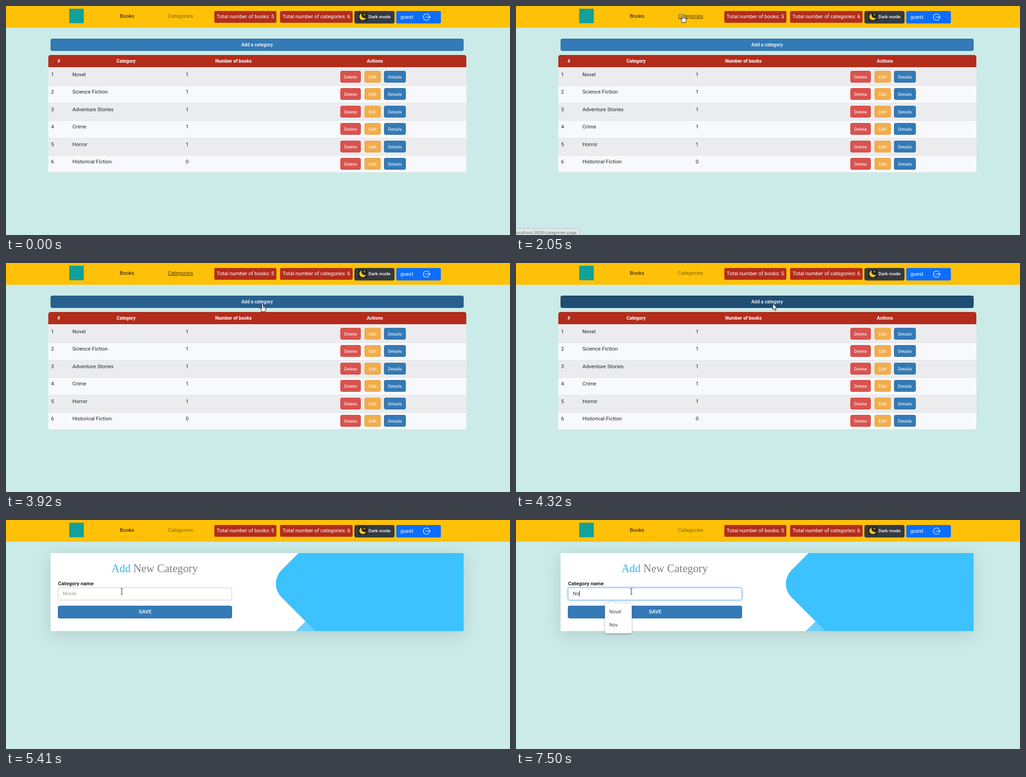
An HTML page for the animation above (8000 ms loop, 1108 by 505 pixels).

```html
<!DOCTYPE html>
<html lang="en">
<head>
<meta charset="utf-8">
<title>Category manager</title>
<style>
  html, body { margin: 0; width: 100%; height: 100%; overflow: hidden; background: #cbebe8; }
  svg { display: block; width: 100%; height: 100%; }
  text { font-family: Roboto, sans-serif; white-space: pre; }
  .serif { font-family: "Liberation Serif", serif; }
  .system { font-family: "Open Sans", sans-serif; }
  .card { filter: drop-shadow(0 7px 19px rgba(0, 0, 0, .13)); }
  .popup { filter: drop-shadow(0 1px 2px rgba(0, 0, 0, .35)); }
  .glow { filter: drop-shadow(0 0 3px rgba(102, 175, 233, .7)); }
</style>
</head>
<body>
<svg id="stage" viewBox="0 0 1108 505"></svg>
<script>
const LOOP = 8000;
const RED = '#b32c1c', BLUE = '#337ab7', BLUE_EDGE = '#2e6da4', INK = '#212529';

const rect = (x, y, w, h, fill, extra = '') =>
  `<rect x="${x}" y="${y}" width="${w}" height="${h}" fill="${fill}" ${extra}/>`;
const box = (x, y, w, h, fill, edge, extra = '') =>
  rect(x + .5, y + .5, w - 1, h - 1, fill, `rx="3" stroke="${edge}" ${extra}`);
const path = (d, fill, extra = '') => `<path d="${d}" fill="${fill}" ${extra}/>`;
const text = (x, y, label, size, fill, extra = '') =>
  `<text x="${x}" y="${y}" font-size="${size}" fill="${fill}" ${extra}>${label}</text>`;
const centered = (x, y, label, size, fill, weight = 400) =>
  text(x, y, label, size, fill, `text-anchor="middle" font-weight="${weight}"`);
const group = (id, body, extra = '') => `<g id="${id}" ${extra}>${body}</g>`;

function navbar() {
  return rect(0, 0, 1108, 48, '#ffc107') +
    rect(139, 6, 32, 32, '#12a19a') +
    text(250, 26, 'Books', 11.5, '#1a1401', 'id="books"') +
    text(356, 26, 'Categories', 11.5, '#80610a', 'id="categories"') +
    rect(458, 11, 136.5, 26, RED, 'rx="3"') +
    text(463, 27, 'Total number of books: 5', 11.42, '#fff') +
    rect(602.5, 11, 159.5, 26, RED, 'rx="3"') +
    text(608, 27, 'Total number of categories: 6', 11.42, '#fff') +
    box(766, 11, 88, 27.5, '#343a40', '#2b3035') +
    rect(775, 15, 19, 18, '#22262a') +
    path('M782 16.5a7.5 7.5 0 1 0 9.5 9.5a7.3 7.3 0 0 1-9.5-9.5z', '#ffc61a') +
    path('M788 16.5l.8 1.8 1.8.7-1.8.7-.8 1.8-.8-1.8-1.8-.7 1.8-.7z', '#ffc61a') +
    text(797, 27, 'Dark mode', 9.95, '#fff', 'font-weight="500"') +
    rect(858, 11, 98, 27.5, '#0d6efd', 'rx="3"') +
    text(867, 28, 'guest', 11.45, '#fff') +
    path('M930 20.2a7 7 0 1 0 0 8.6M922 24.5h10.5m-3-3l3 3-3 3', 'none',
      'stroke="#fff" stroke-width="1.2"');
}

function tablePage() {
  const rows = ['Novel', 'Science Fiction', 'Adventure Stories', 'Crime', 'Horror', 'Historical Fiction'];
  const actions = [
    [735, 45, 'Delete', '#d9534f', '#d43f3a'],
    [788, 36, 'Edit', '#f0ad4e', '#eea236'],
    [831, 48, 'Details', BLUE, BLUE_EDGE],
  ];
  const rowTop = i => i ? Math.round(137 + 38.4 * i) : 135;
  const body = rows.map((name, i) => {
    const top = rowTop(i), dy = Math.round(38.4 * i), base = 155 + dy;
    return rect(93, top, 919, rowTop(i + 1) - top, i % 2 ? '#f8f9fc' : '#ececee') +
      (i ? rect(93, top, 919, 1, '#dfe3e6') : '') +
      text(99, base, i + 1, 11.5, INK) +
      text(146, base, name, 11.5, INK) +
      text(395, base, i < 5 ? 1 : 0, 11.5, INK) +
      actions.map(([x, w, label, fill, edge]) =>
        box(x, 143 + dy, w, 26, fill, edge) +
        centered(x + w / 2, 159.5 + dy, label, 9.95, '#fff')).join('');
  }).join('');
  const heads = [[116, '#'], [264, 'Category'], [500, 'Number of books'], [811, 'Actions']];
  return box(98, 72, 908, 27, BLUE, BLUE_EDGE, 'id="add"') +
    centered(552, 89, 'Add a category', 10.3, '#fff', 500) +
    `<clipPath id="round">${rect(93, 108, 919, 260, '#000', 'rx="5"')}</clipPath>` +
    `<g clip-path="url(#round)">${rect(93, 108, 919, 28, RED)}${body}` +
    rect(93, 366.5, 919, 1, '#dfe3e6') + '</g>' +
    heads.map(([x, label]) => centered(x, 125, label, 10.3, '#fff', 700)).join('');
}

function popup(id, width, items) {
  const height = 7.5 + 29.4 * items.length;
  return group(id,
    path('M205 184.5l7-7 7 7z', '#fff') +
    rect(195.5, 183.5, width, height, '#fff', 'rx="3"') +
    items.map((item, i) =>
      text(205, 205.7 + 29.45 * i, item, 10, '#2b2b2b', 'class="system"')).join(''),
    'class="popup"');
}

function formPage() {
  return rect(98, 73, 908, 172, '#fff', 'class="card"') +
    path('M659 223L637 245H681z', '#6acffe') +
    path('M643 73L605.5 110.7A42.2 42.2 0 0 0 605.5 170.3L680 245H1006V73z', '#3cc2ff') +
    `<text x="232" y="115" font-size="24.4" class="serif" fill="#808080"><tspan fill="#35b6f2">Add</tspan> New Category</text>` +
    text(114.5, 144, 'Category name', 11.45, INK, 'font-weight="700"') +
    box(114, 149, 383, 28, '#fff', '#c6c6c6', 'id="input"') +
    text(125, 166, '', 11.5, '#999', 'id="value"') +
    rect(125, 155, 1, 14, '#222', 'id="caret"') +
    box(114, 189, 383, 28, BLUE, BLUE_EDGE) +
    centered(306, 206, 'SAVE', 11.5, '#fff', 500) +
    popup('history', 108, ['Market', 'Deneme', 'Talira Venkoral', 'Shoes', 'Flowers', 'Kinderen']) +
    popup('matches', 59, ['Novel', 'Nov']);
}

const cursors =
  group('arrow', path('M0 0V13.5L3 10.7 5 15.5 7.2 14.6 5.2 9.8H9.5z', '#fff', 'stroke="#111"')) +
  group('hand', path('M-1.5 1.5q0-1.5 1.5-1.5q1.5 0 1.5 1.5V7q1.8-1 2.2.6q1.7-.6 2 .8q1.5-.3 1.5 1.5V13' +
    'q0 2-1.5 4V18.5H-2V17q-1-2.5-3.2-6q-.2-2 1.7-1.2L-1.5 11.5z', '#fff', 'stroke="#111"') +
    path('M1.5 7v4M3.7 8v3M5.7 9v2', 'none', 'stroke="#111" stroke-width=".7"')) +
  group('ibeam', path('M-2.5.5H-.7L0 1 .7.5H2.5M0 1V13M-2.5 13.5H-.7L0 13 .7 13.5H2.5', 'none', 'stroke="#222"'));

document.getElementById('stage').innerHTML =
  rect(0, 0, 1108, 505, '#cbebe8') + navbar() +
  group('table', tablePage()) + group('form', formPage()) +
  group('status', rect(-3, 490.5, 142.5, 18, '#e3e8ea', 'id="bar" rx="3" stroke="#b5bfc0"') +
    text(-2.4, 503, '', 9.4, '#5b6064', 'class="system" id="url"')) +
  group('cursor', cursors);

const ui = {};
document.querySelectorAll('[id]').forEach(node => ui[node.id] = node);

// Each track holds [time, value...]; a value stays until the next entry.
const tracks = {
  cursor: [
    [0, ''], [350, 'arrow', 1062, 488], [430, 'arrow', 985, 420], [510, 'arrow', 850, 325],
    [590, 'arrow', 680, 225], [670, 'arrow', 520, 140], [740, 'hand', 400, 80], [820, 'arrow', 318, 34],
    [1050, 'arrow', 314, 32], [1130, 'arrow', 302, 28], [1210, 'hand', 281, 22], [1290, 'hand', 273, 16],
    [1370, 'hand', 268, 11], [1440, 'hand', 265, 9], [1520, 'hand', 264, 11], [1600, 'hand', 264, 13],
    [1680, 'hand', 265, 15], [1750, 'hand', 267, 17], [1820, 'hand', 269, 18],
    [1890, 'arrow', 296, 19], [1970, 'arrow', 338, 18], [2050, 'hand', 367, 18], [2120, 'hand', 371, 19],
    [2300, 'hand', 374, 20], [2370, 'hand', 377, 21], [2440, 'hand', 378, 22],
    [3080, 'hand', 378, 25], [3160, 'arrow', 379, 36], [3240, 'arrow', 381, 50], [3320, 'arrow', 385, 65],
    [3400, 'hand', 389, 79], [3470, 'hand', 393, 87], [3540, 'hand', 396, 92], [3630, 'hand', 470, 92],
    [3700, 'hand', 540, 90], [3770, 'hand', 565, 90], [3920, 'hand', 564, 89], [4240, 'arrow', 564.5, 89.5],
    [4870, 'arrow', 520, 97], [4950, 'arrow', 395, 127], [5020, 'ibeam', 290, 158], [5100, 'ibeam', 255, 163],
    [5250, 'ibeam', 255, 159], [5330, 'ibeam', 255, 154], [5410, 'ibeam', 254.5, 150.5], [6690, 'ibeam', 253.5, 150.5],
  ],
  link: [[0, ''], [1210, 'books'], [1890, ''], [2050, 'categories'], [4160, '']],
  url: [[0, ''], [1210, 'books'], [2050, 'categories'], [3240, '']],
  add: [[0, BLUE, BLUE_EDGE], [740, '#286090', '#204d74'], [820, BLUE, BLUE_EDGE],
    [3630, '#286090', '#204d74'], [4160, '#204d74', '#122b40']],
  page: [[0, 'table'], [4410, 'form']],
  focus: [[0, false], [5650, true]],
  popup: [[0, ''], [5710, 'history'], [7280, 'matches']],
  caret: [[0, 0], [5650, 125], [6110, 0], [6580, 125], [7210, 133], [7500, 139]],
  typed: [[0, ''], [7210, 'N'], [7500, 'No']],
};

const at = (name, t) => tracks[name].findLast(step => step[0] <= t).slice(1);
const show = (node, on) => node.style.display = on ? '' : 'none';
const set = (node, attrs) => Object.entries(attrs).forEach(([key, value]) => node.setAttribute(key, value));

function render(t) {
  const [kind, x = 0, y = 0] = at('cursor', t);
  for (const name of ['arrow', 'hand', 'ibeam']) show(ui[name], name === kind);
  set(ui.cursor, { transform: `translate(${x} ${y})` });

  const [link] = at('link', t);
  for (const name of ['books', 'categories'])
    set(ui[name], { 'text-decoration': name === link ? 'underline' : 'none' });
  set(ui.categories, { fill: link === 'categories' ? '#4d3a02' : '#80610a' });

  const [url] = at('url', t);
  show(ui.status, url);
  ui.url.textContent = `localhost:3000/${url}-page`;
  set(ui.bar, { width: url === 'books' ? 124.5 : 142.5 });

  const [page] = at('page', t);
  show(ui.table, page === 'table');
  show(ui.form, page === 'form');
  const [fill, stroke] = at('add', t);
  set(ui.add, { fill, stroke });

  const [focus] = at('focus', t);
  set(ui.input, { stroke: focus ? '#66afe9' : '#c6c6c6', class: focus ? 'glow' : '' });
  const [open] = at('popup', t);
  for (const name of ['history', 'matches']) show(ui[name], name === open);

  const [typed] = at('typed', t);
  ui.value.textContent = typed || 'Novel';
  set(ui.value, { fill: typed ? '#444' : '#999' });
  const [caret] = at('caret', t);
  show(ui.caret, caret);
  set(ui.caret, { x: caret });
}

const start = performance.now();
function tick() {
  render((performance.now() - start) % LOOP);
  requestAnimationFrame(tick);
}
tick();
</script>
</body>
</html>
```
